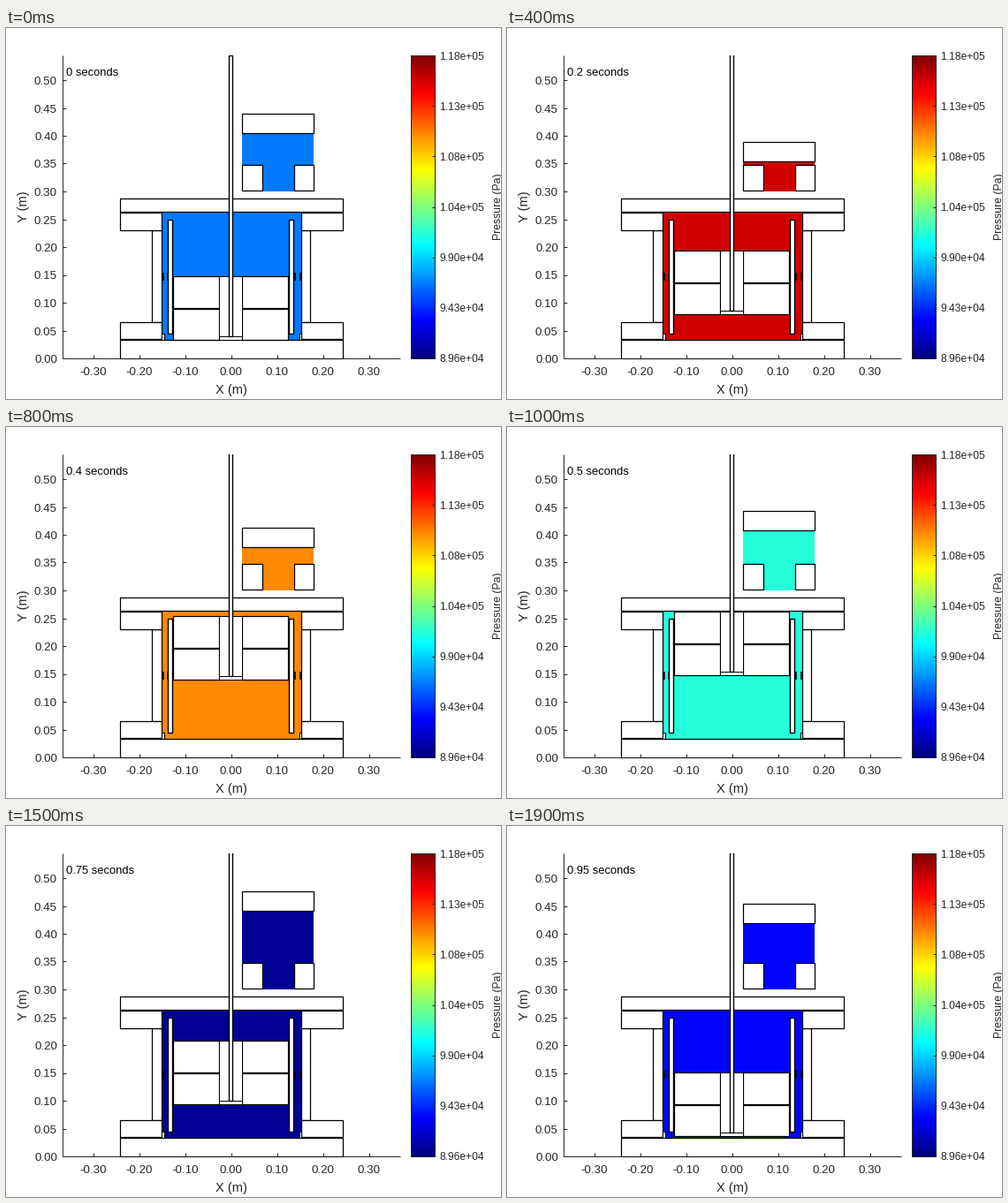
A matplotlib script for the animation above (2000 ms loop, 560x420 px).

```python
import numpy as np
import matplotlib.pyplot as plt
from matplotlib.animation import FuncAnimation
from matplotlib.colors import ListedColormap
from matplotlib.patches import Rectangle

W, H, DPI = 560, 420, 80
PT = 72 / DPI                      # points per pixel
FRAMES, INTERVAL = 20, 100
GREY = "#262626"
LEFT, RIGHT, TOP, BASE = 64, 446, 31, 374   # plot area in pixels
X0, X_SCALE, Y_SCALE = 255, 520, 630        # pixels per metre
LEAD = 0.025                                # crank angle at time zero

plt.rcParams["font.family"] = "Liberation Sans"
fig = plt.figure(figsize=(W / DPI, H / DPI), dpi=DPI, facecolor="white")
ax = fig.add_axes([0, 0, 1, 1])
ax.axis("off")


def jet(u):
    """Classic jet ramp, u in 0..1."""
    u = np.clip(u, 0, 1)
    return tuple(float(np.clip(1.5 - abs(4 * u - k), 0, 1)) for k in (3, 2, 1))


def box(x1, y1, x2, y2, lw=1.25):
    """White outlined rectangle between two corners."""
    return ax.add_patch(Rectangle((x1, y1), x2 - x1, y2 - y1, fc="white",
                                  ec="black", lw=lw * PT, joinstyle="miter"))


def gas(x1, y1, x2, y2):
    return ax.add_patch(Rectangle((x1, y1), x2 - x1, y2 - y1, lw=0))


def line(xs, ys, color=GREY, lw=1.0):
    ax.plot(xs, ys, color=color, lw=lw * PT, solid_capstyle="butt", snap=True)


def label(x, y, s, px, ha="center", color=GREY, rot=0):
    return ax.text(x, y, s, fontsize=px * PT, ha=ha, va="baseline",
                   color=color, rotation=rot, rotation_mode="anchor")


def span(patch, y1, y2):
    patch.set_y(y1)
    patch.set_height(y2 - y1)


def crank(radius, rod, angle):
    """Offset of a slider-crank, positive downwards on screen."""
    lag = rod - np.sqrt(rod ** 2 - (radius * np.sin(angle)) ** 2)
    return radius * np.cos(angle) - lag


# colour bar
ramp = np.linspace(1, 0, 256)[:, None]
ax.imshow(ramp, cmap=ListedColormap([jet(u) for u in np.linspace(0, 1, 256)]),
          extent=(458, 485, BASE, TOP), aspect="auto", interpolation="nearest",
          vmin=0, vmax=1, zorder=0)
line([458, 485, 485, 458, 458], [TOP, TOP, BASE, BASE, TOP])
bar_labels = ["8.96e+04", "9.43e+04", "9.90e+04", "1.04e+05",
              "1.08e+05", "1.13e+05", "1.18e+05"]
for y, s in zip(np.linspace(BASE, TOP, 7), bar_labels):
    line([482, 485], [y, y])
    label(490.5, y + 4.5, s, 12, "left")
label(560, 202.5, "Pressure (Pa)", 12.2, rot=90)

# axes
line([LEFT, LEFT], [TOP, BASE])
line([LEFT, RIGHT], [BASE, BASE])
for i in range(-3, 4):
    x = X0 + i * 0.1 * X_SCALE
    line([x, x], [BASE - 4, BASE])
    label(x - 0.5, 393, f"{i / 10:.2f}", 13.33)
for i in range(11):
    y = BASE - i * 0.05 * Y_SCALE
    line([LEFT, LEFT + 4], [y, y])
    label(58, y + 5, f"{i * 0.05:.2f}", 13.33, "right")
label(255, 414, "X (m)", 14.67)
label(24, 202.5, "Y (m)", 14.67, rot=90)
clock = label(68, 54, "", 13, "left", "black")

# main cylinder
gas_main = gas(176, 208, 334, 353)
box(129, 193, 381, 208)
box(129, 353, 381, BASE)
for flange, wall, sleeve, step, marks in (
        ((129, 176), (165, 176), (183, 188), (176, 179), (178, 183)),
        ((334, 381), (334, 344), (320, 325), (332, 334), (327, 333))):
    box(wall[0], 229, wall[1], 333)
    box(flange[0], 209, flange[1], 229)
    box(flange[0], 333, flange[1], 352)
    box(sleeve[0], 217, sleeve[1], 346, 1.4)
    box(step[0], 346, step[1], 353, 1)
    for x in marks:
        line([x, x], [277, 286], "black", 1.6)

# displacer: two halves on each side, hub, foot and rod
upper = [box(189, 0, 241, 1), box(267, 0, 319, 1)]
lower = [box(189, 0, 241, 1), box(267, 0, 319, 1)]
hub = box(241, 0, 267, 1, 1)
foot = box(241, 0, 267, 1, 1)
rod = box(252, 0, 256, 1, 1.4)

# power cylinder
gas_power = gas(267, 0, 348, 1)
gas_port = gas(290, 155, 326, 185)
box(267, 155, 290, 184)
box(326, 155, 348, 184)
piston = box(267, 0, 348, 1)

ax.set_xlim(0, W)
ax.set_ylim(H, 0)
rod.set_clip_path(Rectangle((LEFT, TOP), RIGHT - LEFT, BASE - TOP,
                            transform=ax.transData))


def draw(n):
    angle = 2 * np.pi * n / FRAMES + LEAD
    top = 244.75 + crank(36.25, 220, angle)
    bottom, mid = top + 72, top + 36
    for p in upper:
        span(p, top, mid)
    for p in lower:
        span(p, mid + 1, bottom)
    span(hub, top, bottom - 4)
    span(foot, bottom - 4, bottom)
    span(rod, bottom - 321.6, bottom - 4)

    head = 102.5 + crank(28.3, 63.1, angle - np.pi / 2)
    span(piston, head, head + 22)
    span(gas_power, head + 22, 155)

    # ideal gas: the displacer heats the charge, the piston expands it
    rise, lift = 281 - top, 95.6 - head
    pressure = 1 / (1.04 - 0.00076 * rise + 0.0046 * lift)
    color = jet((pressure - 0.896) / 0.284)
    for p in (gas_main, gas_power, gas_port):
        p.set_facecolor(color)
    clock.set_text(f"{n * 0.05:.3g} seconds")
    return []


anim = FuncAnimation(fig, draw, frames=FRAMES, interval=INTERVAL,
                     init_func=lambda: draw(0), repeat=True, repeat_delay=0)
plt.show()
```
